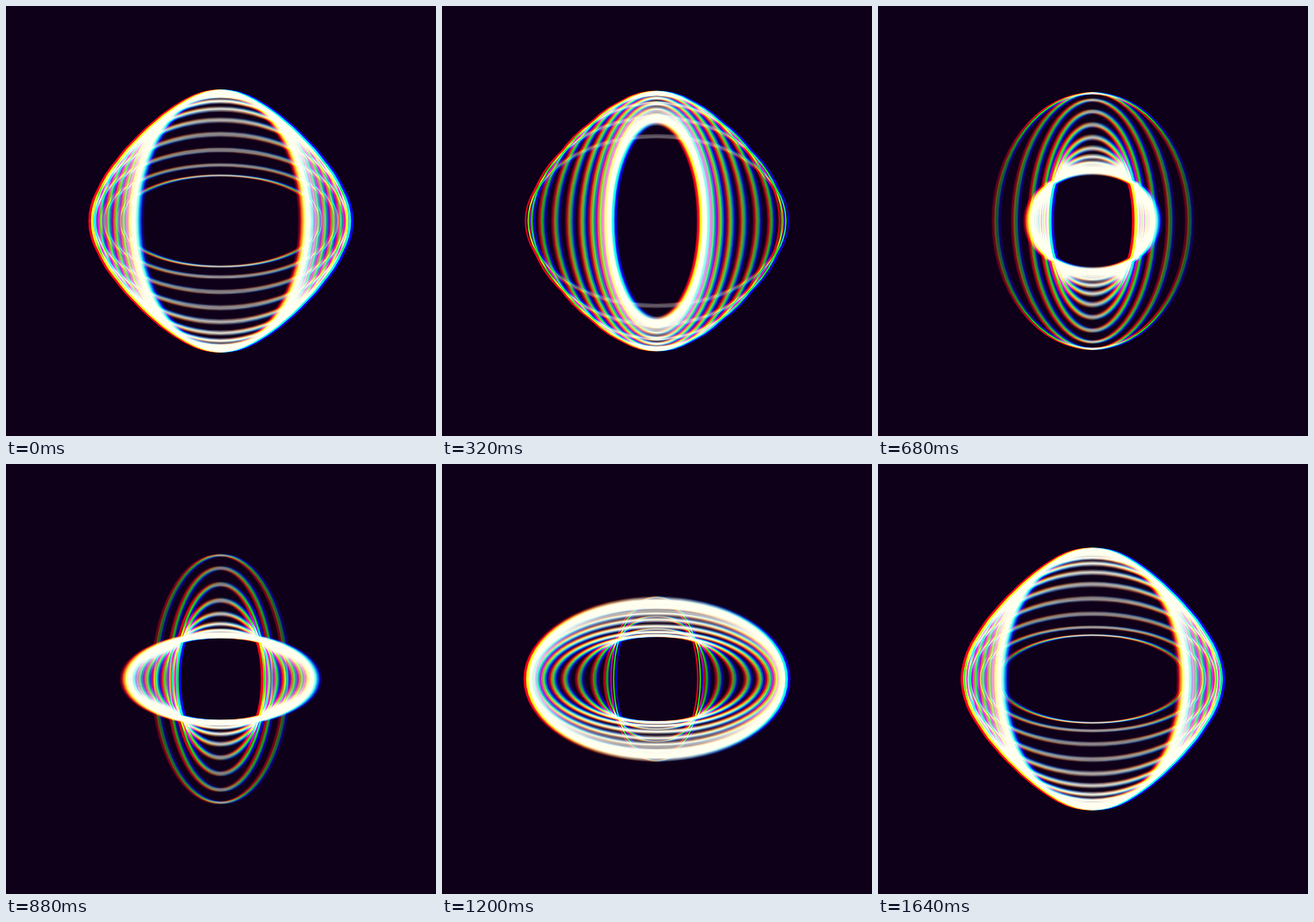
An HTML page with a canvas for the animation above (1.68 s loop, 500 by 500 pixels).

```html
<!DOCTYPE html>
<html>
<head>
<meta charset="utf-8">
<style>
  html, body { margin: 0; width: 100%; height: 100%; overflow: hidden; background: #0f0019; }
  canvas { display: block; width: 500px; height: 500px; }
</style>
</head>
<body>
<canvas id="stage" width="500" height="500"></canvas>
<script>
const SIZE = 500, CENTER = SIZE / 2;
const STEP = 40, STEPS = 42;          // ms per step, steps per loop
const SAMPLES = 5, SHUTTER = 0.65;    // motion blur
const RINGS = 13, LAG = 0.01975;      // the phase lag grows with the square of the index
const CHANNELS = [
  { color: '#f00', dx: -3 },
  { color: '#0f0', dx: 0 },
  { color: '#0000f0', dx: 3 }
];

const screen = document.getElementById('stage').getContext('2d');
const buffer = document.createElement('canvas');
buffer.width = buffer.height = SIZE;
const ctx = buffer.getContext('2d');

function drawRings(phase) {
  ctx.globalCompositeOperation = 'source-over';
  ctx.fillStyle = '#0f0019';
  ctx.fillRect(0, 0, SIZE, SIZE);
  ctx.globalCompositeOperation = 'lighten';
  for (let i = 0; i < RINGS; i++) {
    const a = phase - LAG * i * i;
    const rx = 100 - 50 * Math.sin(a), ry = 100 + 50 * Math.cos(a);
    ctx.lineWidth = 6 - 4.5 * i / (RINGS - 1);
    for (const { color, dx } of CHANNELS) {
      ctx.strokeStyle = color;
      ctx.beginPath();
      ctx.ellipse(CENTER + dx, CENTER, rx, ry, 0, 0, 2 * Math.PI);
      ctx.stroke();
    }
  }
}

function render(step) {
  screen.globalCompositeOperation = 'source-over';
  screen.globalAlpha = 1;
  screen.fillStyle = '#000';
  screen.fillRect(0, 0, SIZE, SIZE);
  screen.globalCompositeOperation = 'lighter';
  screen.globalAlpha = 1 / SAMPLES;
  for (let k = 0; k < SAMPLES; k++) {
    drawRings(2 * Math.PI * (step + SHUTTER * (k + 0.5) / SAMPLES) / STEPS);
    screen.drawImage(buffer, 0, 0);
  }
}

let start, shown = -1;
function tick(now) {
  start ??= now;
  const step = Math.max(0, Math.floor((now - start) / STEP)) % STEPS;
  if (step !== shown) render(shown = step);
  requestAnimationFrame(tick);
}
requestAnimationFrame(tick);
</script>
</body>
</html>
```
